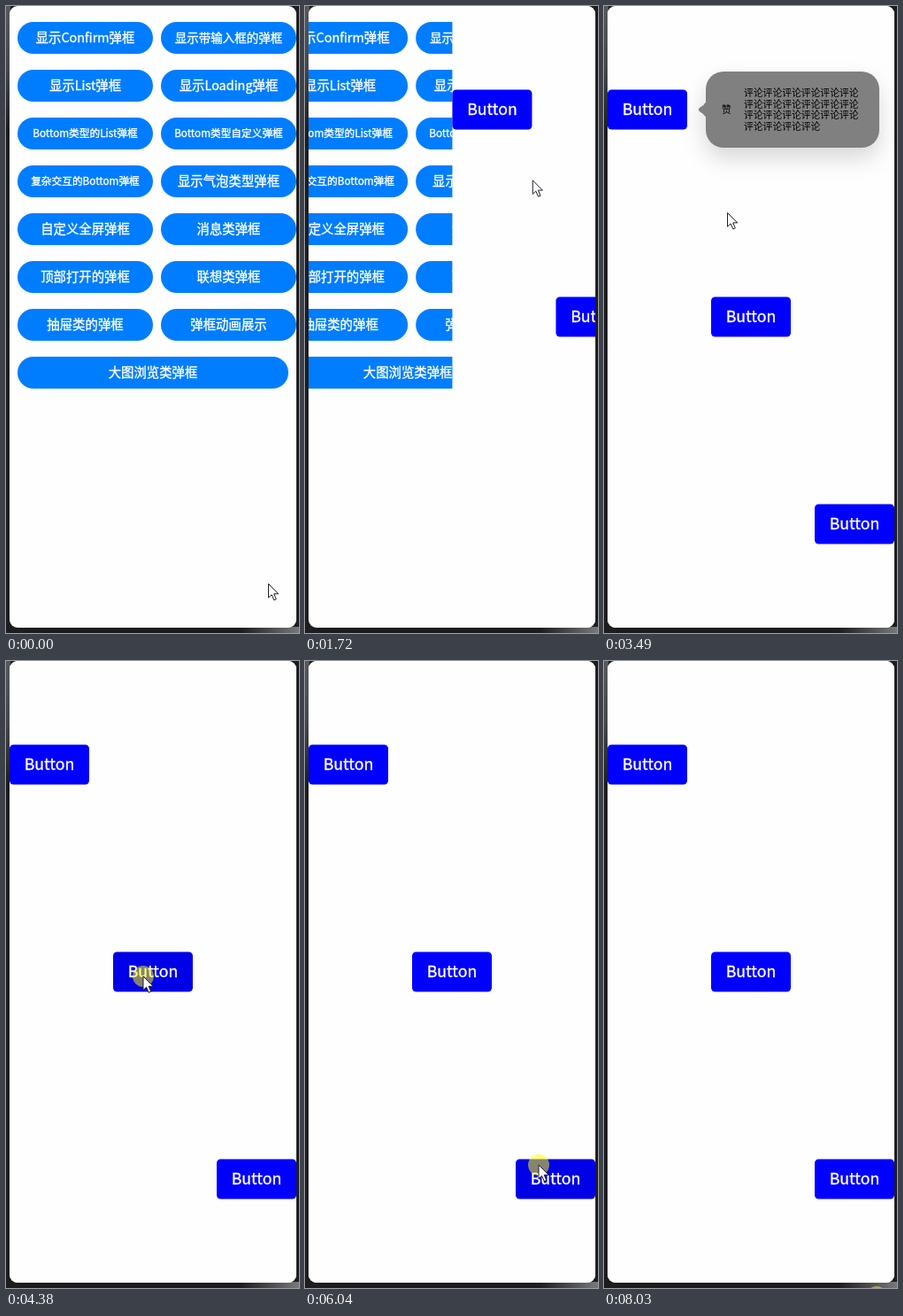
An HTML page for the animation above (8150 ms loop, 331 by 708 pixels).

```html
<!DOCTYPE html>
<html lang="zh-CN">
<head>
<meta charset="utf-8">
<title>弹框</title>
<style>
html, body { margin: 0; width: 100%; height: 100%; overflow: hidden; background: #1d1d1f; }
svg { display: block; width: 331px; height: 708px; }
text { font-family: "Noto Sans CJK SC", "Noto Sans CJK", "Noto Sans", sans-serif; }
.label { fill: #fff; stroke: #fff; stroke-width: .35px; text-anchor: middle; }
</style>
</head>
<body>
<svg viewBox="0 0 331 708" width="331" height="708">
  <defs>
    <linearGradient id="side" x1="0" y1="0" x2="0" y2="1">
      <stop offset="0" stop-color="#56585c"/>
      <stop offset=".1" stop-color="#44464a"/>
      <stop offset=".2" stop-color="#1d1d1f"/>
    </linearGradient>
    <linearGradient id="base" x1="0" x2="1">
      <stop offset=".8" stop-color="#1d1d1f"/>
      <stop offset=".9" stop-color="#4a4a4c"/>
      <stop offset="1" stop-color="#77787a"/>
    </linearGradient>
    <clipPath id="screen"><rect x="4" y="0" width="324" height="702" rx="9"/></clipPath>
    <filter id="shadow" x="-40%" y="-80%" width="180%" height="300%">
      <feDropShadow dx="0" dy="12" stdDeviation="12" flood-color="#000" flood-opacity=".15"/>
    </filter>
  </defs>
  <rect width="331" height="708" fill="#1d1d1f"/>
  <rect width="5" height="708" fill="url(#side)"/>
  <rect y="701" width="331" height="7" fill="url(#base)"/>
  <g clip-path="url(#screen)">
    <rect x="4" width="324" height="702" fill="#fefefe"/>
    <g id="menu"></g>
    <g id="demo"><rect x="4" width="324" height="702" fill="#fefefe"/></g>
    <g id="popups"></g>
  </g>
  <circle id="tap" r="12" fill="#ff0" fill-opacity=".52"/>
  <path id="cursor" d="M0 0V15.6L3.6 12.3 6.3 18.4 8.8 17.3 6.2 11.3H11.2Z" fill="#fff" stroke="#1c1c2c" stroke-width="1" stroke-linejoin="round"/>
</svg>
<script>
const $ = id => document.getElementById(id);
const LOOP = 8150, TICK = 110, LAST = 73;

function add(parent, tag, attrs, text) {
  const el = document.createElementNS('http://www.w3.org/2000/svg', tag);
  for (const k in attrs) el.setAttribute(k, attrs[k]);
  if (text) el.textContent = text;
  return parent.appendChild(el);
}

// Menu page: labels shrink by one font unit until they fit
const UNIT = .9, FIT = 124.5;

function pill(x, y, width, label) {
  const box = add($('menu'), 'rect', { x, y, width, height: 36, rx: 18, fill: '#007dff' });
  const text = add($('menu'), 'text', { class: 'label', x: x + width / 2 }, label);
  let size = 16 * UNIT;
  text.setAttribute('font-size', size);
  while (size > 8 && text.getComputedTextLength() > FIT) {
    size -= UNIT;
    text.setAttribute('font-size', size);
  }
  text.setAttribute('y', y + 18 + size * .36);
  return box;
}

const items = [
  '显示Confirm弹框', '显示带输入框的弹框', '显示List弹框', '显示Loading弹框',
  'Bottom类型的List弹框', 'Bottom类型自定义弹框', '复杂交互的Bottom弹框', '显示气泡类型弹框',
  '自定义全屏弹框', '消息类弹框', '顶部打开的弹框', '联想类弹框', '抽屉类的弹框', '弹框动画展示'
].map((label, i) => pill(13 + 162 * (i % 2), 18 + 54 * (i >> 1), 153, label));
pill(13, 396, 306, '大图浏览类弹框');
const chosen = items[7];

// Demo page: three buttons on a diagonal
const buttons = [0, 1, 2].map(i => {
  const x = 4 + 117 * i, y = 94.5 + 234 * i;
  const box = add($('demo'), 'rect', { x, y, width: 90, height: 45, rx: 4.5, fill: '#00f' });
  add($('demo'), 'text', { class: 'label', x: x + 45, y: y + 28.8, 'font-size': 17.7 }, 'Button');
  return box;
});

function popup(x, y, width, height, rx, arrow, texts) {
  const g = add($('popups'), 'g', {});
  const body = add(g, 'g', { fill: '#808080', filter: 'url(#shadow)' });
  add(body, 'rect', { x, y, width, height, rx });
  if (arrow) add(body, 'path', { d: 'M-9-.5Q-5 2-2.5 6.5Q0 10 2.5 6.5Q5 2 9-.5z', transform: arrow });
  for (const [tx, ty, s] of texts) add(g, 'text', { x: tx, y: ty + 4, 'font-size': 10.8 }, s);
  return g;
}

const say = n => '评论'.repeat(n);
const popups = [
  popup(115, 74, 196, 86, 20, 'translate(115 117) rotate(90)',
    [[133, 116.8, '赞'], ...[6, 6, 6, 4].map((n, i) => [158, 98 + 12.6 * i, say(n)])]),
  popup(87, 259, 158, 49, 22, 'translate(166 308)',
    [[105, 283.3, '第一段文字'], [173.5, 283.3, '第二段文字']]),
  popup(28, 560.5, 197, 49, 22, '', [[46, 585, '赞'], [71.5, 585, say(5)]])
];

// Pointer legs in ticks: from, to, target x, y, sideways bend x, y
const legs = [
  [0, 8, 264, 192, -30, 0],
  [14, 23, 67, 113, 0, 70],
  [28, 32, 139.5, 233.5, 0, 0],
  [32, 35, 150, 375, 0, 0],
  [38, 39, 155, 356, 0, 0],
  [43, 46, 131.5, 495.5, 0, 0],
  [50, 54, 264, 569, 0, 0],
  [58, 62, 257.5, 503.5, 0, 0],
  [66, 70, 308, 718, 0, 0]
];
// Each popup: tick of the press that opens it and of the tap that closes it
const visits = [[24, 35], [40, 47], [55, 63]];
const taps = [11, ...visits.flat(), LAST];

const clamp = v => Math.max(0, Math.min(1, v));
const smooth = k => k * k * (3 - 2 * k);
const held = (n, from) => n === from || n === from + 1;

function pointer(n) {
  let x = 296.5, y = 652.5;
  for (const [a, b, tx, ty, bx, by] of legs) {
    const k = smooth(clamp((n - a) / (b - a))), bend = Math.sin(Math.PI * k);
    x += (tx - x) * k + bx * bend;
    y += (ty - y) * k + by * bend;
  }
  return `translate(${x} ${y})`;
}

function draw(ms) {
  const n = Math.min(LAST, Math.floor((ms % LOOP + 35) / TICK));

  const slide = 1 - Math.pow(1 - clamp((n - 14) / 4), 2.4);
  $('demo').setAttribute('transform', `translate(${324 * (1 - slide)} 0)`);
  $('menu').setAttribute('transform', `translate(${-100 * slide} 0)`);
  chosen.setAttribute('fill', n >= 11 && n <= 14 ? '#0071e6' : '#007dff');

  visits.forEach(([open, close], i) => {
    buttons[i].setAttribute('fill', held(n, open) ? '#0000e6' : '#00f');
    const fade = Math.min(clamp((n - open - 1) / 3), clamp((close + 3 - n) / 2));
    popups[i].setAttribute('opacity', fade);
    popups[i].setAttribute('visibility', fade ? 'visible' : 'hidden');
  });

  const at = pointer(n);
  $('cursor').setAttribute('transform', at);
  $('tap').setAttribute('transform', at);
  $('tap').setAttribute('visibility', taps.some(t => held(n, t)) ? 'visible' : 'hidden');
}

const start = performance.now();
function loop() {
  draw(performance.now() - start);
  requestAnimationFrame(loop);
}
loop();
</script>
</body>
</html>
```
